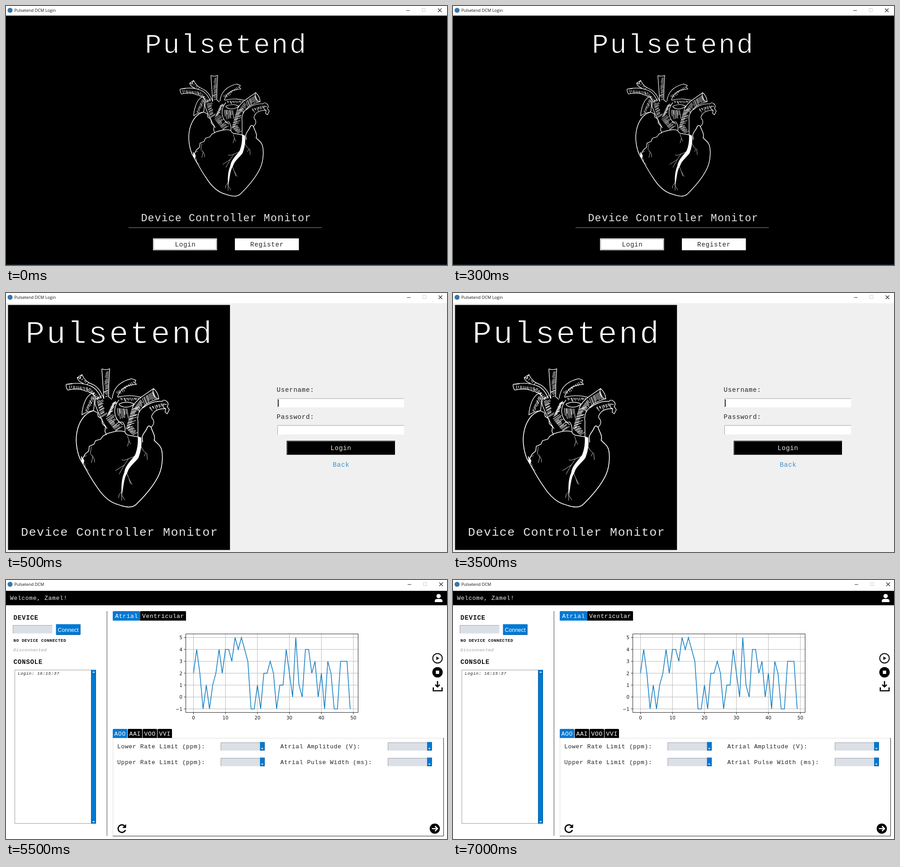
An HTML page for the animation above (8000 ms loop, 975x574 px).

```html
<!DOCTYPE html>
<html lang="en">
<head>
<meta charset="utf-8">
<title>Pulsetend DCM</title>
<style>
  html, body { margin: 0; width: 100%; height: 100%; overflow: hidden; background: #fff; }
  svg { display: block; width: 975px; height: 574px; }
  text { font-family: "Liberation Mono", monospace; letter-spacing: .05em; white-space: pre; }
  .bar { font-family: "Open Sans", sans-serif; letter-spacing: 0; }
  .sans { font-family: "Liberation Sans", sans-serif; letter-spacing: 0; }
  .tick { font-family: "DejaVu Sans", sans-serif; letter-spacing: 0; }
  .thin { stroke: #000; stroke-width: .02em; }
  .bold { font-weight: bold; }
  .italic { font-style: italic; }
  .end { text-anchor: end; }
  .mid { text-anchor: middle; }
</style>
</head>
<body>
<svg id="stage" viewBox="0 0 975 574"></svg>
<script>
const BLUE = '#0079d3', FIELD = '#dbdfe7';
const SMALL = 9.45, BODY = 13, LABEL = 14.2;

const rect = (x, y, w, h, fill, extra = '') =>
  `<rect x="${x}" y="${y}" width="${w}" height="${h}" fill="${fill}" ${extra}/>`;
const path = (d, stroke, width = 1, fill = 'none') =>
  `<path d="${d}" fill="${fill}" stroke="${stroke}" stroke-width="${width}"/>`;
const circle = (x, y, r, fill, extra = '') =>
  `<circle cx="${x}" cy="${y}" r="${r}" fill="${fill}" ${extra}/>`;
const text = (x, y, size, fill, string, cls = '') =>
  `<text x="${x}" y="${y}" font-size="${size}" fill="${fill}" class="${cls}">${string}</text>`;

let seed = 7;
const random = () => (seed = (seed * 16807) % 2147483647) / 2147483647;

// Row of ragged strokes from (x0,y0) to (x1,y1), each running along (dx,dy).
function hatch(x0, y0, x1, y1, dx, dy, count) {
  let d = '';
  for (let i = 0; i < count; i++) {
    const k = (i + random() * 0.6) / count, length = 0.45 + random() * 0.55;
    const x = x0 + (x1 - x0) * k, y = y0 + (y1 - y0) * k;
    d += `M${x.toFixed(1)} ${y.toFixed(1)}l${(dx * length).toFixed(1)} ${(dy * length).toFixed(1)}`;
  }
  return d;
}

function heart() {
  const outline = `M437 235C419 239 408 259 405 279C402 299 407 321 414 333
    C424 350 432 366 442 380C455 401 469 413 485 417C499 422 511 424 519 416
    C538 397 555 376 563 357C570 340 570 316 566 307C563 300 557 297 553 292
    C556 283 550 277 547 267Q543 262 540 267C538 275 531 278 530 287L531 296`;
  const chambers = `M437 235L445 239L446 246L453 251L454 260L460 266L459 275L462 282
    M415 331L421 319L428 313L429 304L438 300L441 293L451 290L455 284L464 279
    C478 275 489 272 497 276Q500 283 507 283L524 286`;
  const vessels = `M385 184Q384 190 388 195Q410 190 422 197Q434 199 441 208L440 222Q446 239 457 260L463 270
    M385 184Q410 179 429 186Q444 191 452 211M385 184L397 183
    M418 182Q408 179 406 171L415 165Q421 179 435 184Q449 190 457 212
    M406 171L411 172L415 165M453 154Q460 157 468 154Q466 181 466 208L472 213
    M453 154Q455 184 457 211M473 211Q476 181 510 173L518 176L516 180L519 184Q491 185 483 208
    M483 209Q504 203 528 209L552 192Q561 200 562 212Q539 218 530 230Q520 239 522 255L522 285
    M552 192Q548 201 556 210L562 212M486 214Q476 226 478 240Q480 254 493 262
    M486 222Q501 215 515 222Q507 229 496 228Q486 226 486 222
    M497 276Q499 266 493 257L484 257M528 209Q515 219 511 230
    M437 200Q424 204 418 225Q415 235 415 243Q425 236 437 235Q440 221 437 200
    M531 230Q549 215 568 217Q572 212 577 217Q582 221 578 227L582 233L578 241L574 238L575 231
    Q568 229 571 222L577 223M575 231Q558 231 552 239Q545 247 551 252Q555 260 547 267`;
  const hatching =
    hatch(391, 186, 428, 190, 1, 8, 12) + hatch(430, 190, 450, 211, -7, 6, 10) +
    hatch(412, 170, 430, 182, -4, 5, 5) + hatch(466, 158, 465, 207, -9, 4, 18) +
    hatch(480, 199, 514, 177, 4, 7, 12) + hatch(434, 206, 421, 235, 4, 7, 12) +
    hatch(442, 212, 452, 249, 12, -7, 16) + hatch(474, 220, 461, 248, 12, -8, 14) +
    hatch(461, 251, 480, 275, 15, -10, 15) + hatch(488, 210, 524, 210, 3, 7, 13) +
    hatch(530, 211, 552, 197, 6, 15, 11) + hatch(482, 230, 502, 231, 3, 21, 9) +
    hatch(510, 231, 499, 270, 17, -5, 19) + hatch(499, 269, 513, 283, 12, -7, 10) +
    hatch(527, 213, 515, 230, 9, 11, 10) + hatch(543, 228, 570, 220, 4, 9, 11);
  const branches = `M433 305L431 318L436 324L433 336M434 321L439 329L439 335
    M417 324L424 322M420 337L422 346L428 352M502 284L505 293L502 304M505 293L508 300
    M517 323L504 328L496 340L487 346L479 351M496 340L486 358M504 328L496 331L491 330
    M500 354L505 367L511 378M505 367L508 377M491 391L486 398L485 404M491 394L491 409M491 398L497 408
    M527 303L533 313L539 318L540 330M537 317L534 323`;
  const vein = `M522 285L528 287Q531 304 523 326C516 336 505 343 502 354
    C494 367 495 382 491 398C490 380 491 366 496 355C498 340 510 331 517 320Q523 305 522 285Z`;
  return path(outline, '#fff', 1.5) + path(chambers, '#fff', 1.3) + path(vessels, '#fff', 1.2) +
    path(hatching, '#fff', 0.95) + path(branches, '#ddd', 0.8) + path(vein, '#fff', 0.3, '#fff') +
    path('M414 324L419 331L418 337L415 335Z', '#fff', 1, '#fff');
}

const poster = text(307, 104, 61.5, '#fff', 'Pulsetend', 'thin') + heart() +
  text(298.5, 477, 23.2, '#e4e4e4', 'Device Controller Monitor');

function titleBar(title, height, shift) {
  const x = 889 + shift;
  return rect(0, 0, 975, height, '#fff') + circle(9, 9.5, 5.5, '#3776ab') +
    text(18.5, 13, 9.2, '#111', title, 'bar') +
    path(`M${x - 4} 10h8`, '#222') + path(`M${x + 31} 5.5h7v7h-7z`, '#ccc') +
    path(`M${x + 66} 5.5l8 8m0 -8l-8 8`, '#222', 1.1);
}

function sunken(x, y, w, h, fill) {
  return rect(x, y, w, h, fill) + path(`M${x + .5} ${y + h}v${.5 - h}h${w - .5}`, '#a0a0a0');
}

function startScene() {
  return rect(0, 0, 975, 574, '#000') + titleBar('Pulsetend DCM Login', 21.3, 0) + poster +
    path('M271 491.2H698', '#999') + rect(0, 572.5, 975, 1.5, '#13232d') +
    rect(325, 515, 141.5, 26.3, '#fff') +
    rect(326.7, 516.7, 138.3, 23, 'none', 'stroke="#333" stroke-dasharray="1 1"') +
    rect(506, 515, 141.5, 26.3, '#fff') +
    text(396.5, 533, LABEL, '#222', 'Login', 'mid') + text(577, 533, LABEL, '#222', 'Register', 'mid');
}

function loginScene() {
  return rect(0, 0, 975, 574, '#f0f0f0') + titleBar('Pulsetend DCM Login', 22.5, 1.5) +
    rect(4.5, 26.5, 490.7, 543, '#000') +
    `<g transform="matrix(1.157 0 0 1.145 -312.3 -8.2)">${poster}</g>` +
    text(598.5, 219, LABEL, '#222', 'Username:') + sunken(600, 233.5, 280, 20, '#fff') +
    rect(601.5, 236, 1.5, 16, '#000') +
    text(598.5, 279, LABEL, '#222', 'Password:') + sunken(600, 293, 280, 20.5, '#fff') +
    rect(620.5, 327.5, 239.5, 31, '#000') + path('M621.8 357V328.8H859', '#555', 1.3) +
    text(740.5, 348, LABEL, '#eee', 'Login', 'mid') + text(741, 385, LABEL, '#3a90cc', 'Back', 'mid');
}

function tab(x, y, w, h, label, active) {
  return path(`M${x} ${y + h}v${2 - h}q0 -2 2 -2h${w - 4}q2 0 2 2v${h - 2}z`, 'none', 0, active ? BLUE : '#000') +
    text(x + w / 2 + .3, y + h / 2 + 4.5, BODY, '#fff', label, 'mid');
}

function combo(x, y, labelX, label) {
  return text(labelX, y + 13, BODY, '#222', label) + sunken(x, y, 87, 18, FIELD) +
    rect(x + 87, y - 1, 10.5, 19, BLUE) + path(`M${x + 87} ${y + 17.5}h10v-18`, '#075187') +
    path(`M${x + 89.5} ${y + 12.5}h5l-2.5 3z`, 'none', 0, '#fff');
}

function chart() {
  const values = [2, 4, 2, -1, 1, -1, 1, 2, 4, 2, 4, 4, 3, 5, 4, 5, 4, 3, -1, -1, 1, -1, 2, 2, 3,
    2, -1, 1, 1, 4, 2, 0, 5, 1, 0, 4, 4, 2, 3, 0, 2, -1, 3, 2, -1, -1, 3, 3, 3, -1];
  const px = i => 414.5 + i * 7.07, py = v => 259.3 - v * 26.37;
  let out = '';
  for (let i = 0; i <= 50; i += 10) {
    out += path(`M${px(i)} 119.5V293.5`, '#b8b8b8') + path(`M${px(i)} 293.5v4`, '#222') +
      text(px(i), 308.5, 10.2, '#111', i, 'tick mid');
  }
  for (let v = -1; v <= 5; v++) {
    out += path(`M397.5 ${py(v)}H778.5`, '#b8b8b8') + path(`M397.5 ${py(v)}h-4`, '#222') +
      text(390, py(v) + 4, 10.2, '#111', String(v).replace('-', '−'), 'tick end');
  }
  const line = 'M' + values.map((v, i) => `${px(i).toFixed(1)} ${py(v).toFixed(1)}`).join('L');
  return out + path(line, '#127dc0', 1.6) +
    rect(397.5, 119.5, 381, 174, 'none', 'stroke="#222"');
}

function icons() {
  return circle(956.5, 35.7, 4.8, '#fff') + path('M948 49v-2q0 -5 5 -5h7q5 0 5 5v2z', 'none', 0, '#fff') +
    circle(954, 173.5, 10.5, '#fff', 'stroke="#000" stroke-width="2"') +
    path('M951.5 169.5l6.5 4l-6.5 4z', 'none', 0, '#000') +
    circle(954, 204.5, 11.5, '#000') + rect(950.3, 200.8, 7.4, 7.4, '#fff') +
    path('M954 224v12M949 232l5 5l5 -5M944.7 238v7.5h19.4v-7.5', '#000', 2.6) +
    path('M262.5 545.5A8.3 8.3 0 1 0 264 554', '#000', 2.8) +
    path('M265.5 541v8.5h-8.5z', 'none', 0, '#000') +
    circle(948, 551, 11.3, '#000') + path('M941.5 551h12M948.5 545.5l5.5 5.5l-5.5 5.5', '#fff', 2.6);
}

function monitorScene() {
  const consoleBox = rect(19.5, 199.5, 179, 340, '#fff', 'stroke="#999"') +
    rect(188.5, 199, 10.5, 341, BLUE) + path('M188.5 199V540M188 539.5H198.5V199M188 208.5h11M188 531.5h11', '#07568f') +
    path('M191 205.5h5.5l-2.75 -3zM191 534.5h5.5l-2.75 3z', 'none', 0, '#fff') +
    text(26, 210, SMALL, '#222', 'Login: 16:15:37', 'italic');
  const modes = ['AOO', 'AAI', 'VOO', 'VVI'].map((m, i) => tab(236 + 33 * i, 330, 32, 20, m, !i)).join('');
  return rect(0, 0, 975, 574, '#fff') + titleBar('Pulsetend DCM', 24, 3) +
    rect(0, 24, 975, 32, '#000') + text(9, 44, BODY, '#eee', 'Welcome, Zamel!') +
    text(16.5, 88, LABEL, '#111', 'DEVICE', 'bold') + sunken(15, 100, 87.5, 18.5, FIELD) +
    rect(110.5, 98, 54, 23.5, BLUE) + path('M111 121H164V98.5', '#075187') +
    text(137.5, 114.5, 12.3, '#fff', 'Connect', 'sans mid') +
    text(16.5, 137, SMALL, '#111', 'NO DEVICE CONNECTED', 'bold') +
    text(16.5, 158, SMALL, '#999', 'Disconnected', 'italic') +
    text(16.5, 186, LABEL, '#111', 'CONSOLE', 'bold') + consoleBox +
    path('M223.3 69V567', '#666', 1.3) +
    tab(236, 69, 60.5, 21, 'Atrial', true) + tab(296.5, 69, 101.5, 21, 'Ventricular', false) +
    chart() + modes +
    path('M236.5 567V350.5H967', '#ddd') + path('M236 567.5H967.5V350', '#222') +
    combo(474.5, 360, 246, 'Lower Rate Limit (ppm):') + combo(474.5, 394.5, 246, 'Upper Rate Limit (ppm):') +
    combo(844, 360, 606.5, 'Atrial Amplitude (V):') + combo(844, 394.5, 606.5, 'Atrial Pulse Width (ms):') +
    icons();
}

const stage = document.getElementById('stage');
stage.innerHTML = [startScene(), loginScene(), monitorScene()].map(s => `<g>${s}</g>`).join('');
const scenes = [...stage.children];

function draw(now) {
  const t = now % 8000;
  const current = t < 500 ? 0 : t < 5500 ? 1 : 2;
  scenes.forEach((scene, i) => scene.style.display = i === current ? '' : 'none');
}

const start = performance.now();
function tick() {
  draw(performance.now() - start);
  requestAnimationFrame(tick);
}
tick();
</script>
</body>
</html>
```
